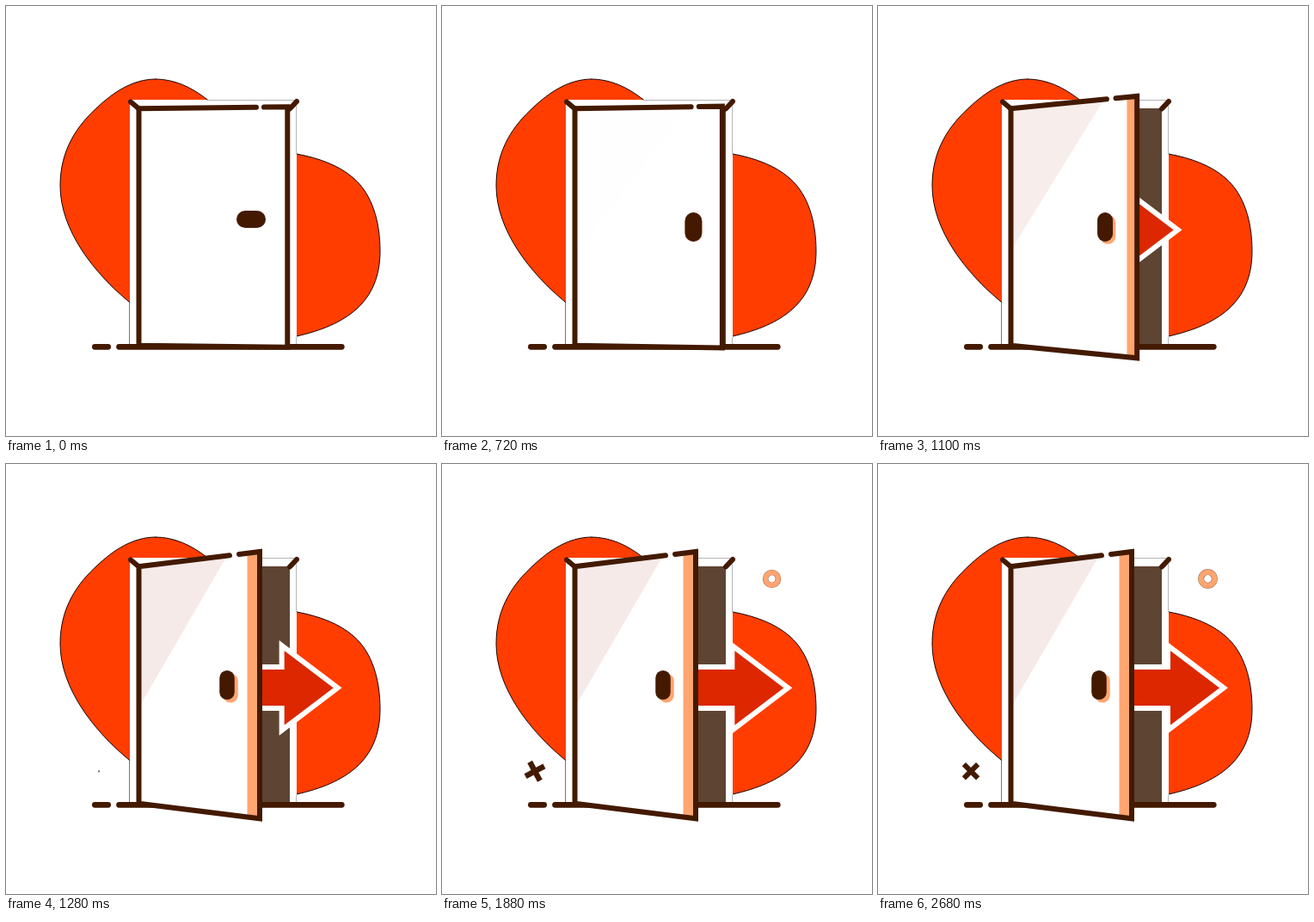
Write an HTML page with a canvas that moves like this. It is 500 px wide and 500 px high and loops after 3.04 s.

```html
<!DOCTYPE html>
<html lang="en">
<head>
<meta charset="utf-8">
<title>Opening door</title>
<style>
  html, body { margin: 0; width: 100%; height: 100%; overflow: hidden; background: #fff; }
  canvas { display: block; width: 500px; height: 500px; }
</style>
</head>
<body>
<canvas id="stage" width="500" height="500"></canvas>
<script>
const ctx = document.getElementById('stage').getContext('2d');
const LOOP = 3040;
const ORANGE = '#ff3d00', BROWN = '#431a00', DARK = '#5e4432';
const PEACH = '#ffa570', RED = '#dc2700', GLASS = '#f5eae8';

const mix = (a, b, k) => a + (b - a) * k;

function ease(t, start, end) {
  const s = Math.min(1, Math.max(0, (t - start) / (end - start)));
  return s * s * (3 - 2 * s);
}

// Eases from one value to a peak, then settles on a final value.
function overshoot(t, [start, top, end], [from, peak, rest]) {
  return t < top ? mix(from, peak, ease(t, start, top)) : mix(peak, rest, ease(t, top, end));
}

function trace(points, closed) {
  ctx.beginPath();
  points.forEach(([x, y]) => ctx.lineTo(x, y));
  if (closed) ctx.closePath();
}

function fill(points, color) {
  trace(points, true);
  ctx.fillStyle = color;
  ctx.fill();
}

function line(points, color = BROWN, width = 6, cap = 'round') {
  trace(points);
  ctx.strokeStyle = color;
  ctx.lineWidth = width;
  ctx.lineCap = cap;
  ctx.stroke();
}

function rect(x1, y1, x2, y2, color) {
  ctx.fillStyle = color;
  ctx.fillRect(x1, y1, x2 - x1, y2 - y1);
}

function pill(x, y, w, h, color) {
  ctx.beginPath();
  ctx.roundRect(x - w / 2, y - h / 2, w, h, Math.min(w, h) / 2);
  ctx.fillStyle = color;
  ctx.fill();
}

function drawBlob() {
  ctx.beginPath();
  ctx.moveTo(174, 85);
  ctx.bezierCurveTo(195, 85, 215, 94, 233, 108);
  ctx.bezierCurveTo(270, 138, 300, 165, 338, 172);
  ctx.bezierCurveTo(365, 177, 388, 186, 404, 200);
  ctx.bezierCurveTo(426, 219, 435, 251, 435, 285);
  ctx.bezierCurveTo(435, 345, 395, 371, 338, 384);
  ctx.bezierCurveTo(270, 400, 200, 390, 143, 344);
  ctx.bezierCurveTo(103, 311, 63, 261, 63, 209);
  ctx.bezierCurveTo(63, 166, 84, 138, 106, 118);
  ctx.bezierCurveTo(124, 101, 147, 85, 174, 85);
  ctx.fillStyle = ORANGE;
  ctx.fill();
  ctx.strokeStyle = '#1a0500';
  ctx.lineWidth = 1;
  ctx.stroke();
}

function drawFrame() {
  rect(144, 109, 338, 395, '#fff');
  const hair = (x1, y1, x2, y2, color) => line([[x1, y1], [x2, y2]], color, 1, 'butt');
  hair(233, 109.5, 338, 109.5, '#b5b5b5');
  hair(337.5, 116, 337.5, 172, '#b5b5b5');
  hair(337.5, 385, 337.5, 394, '#b5b5b5');
  hair(143.5, 345, 143.5, 394, '#777');
  rect(157, 119, 330, 394, DARK);
  line([[103.3, 396.3], [118.7, 396.3]], BROWN, 6.7);
  line([[131.5, 396.3], [390.3, 396.3]], BROWN, 6.7);
  line([[338, 111], [330, 119.5]]);
}

function drawArrow(t) {
  const dx = overshoot(t, [620, 1500, 1960], [-130, 4.5, 0]);
  const head = 337 + dx, tip = 402 + dx;
  const shape = [[190, 236], [head, 236], [head, 211], [tip, 260.3],
                 [head, 309.6], [head, 284], [190, 284]];
  fill(shape, RED);
  ctx.strokeStyle = '#fff';
  ctx.lineWidth = 6;
  ctx.stroke();
}

function drawHandle(t, p) {
  const turn = ease(t, 100, 620);
  if (turn < 1) {
    ctx.save();
    ctx.translate(294, 248);
    ctx.rotate(-turn * Math.PI / 2);
    pill(-9, 0, 34, 20, BROWN);
    ctx.restore();
    return;
  }
  const x = 294 - 37 * p, w = 20 - 2.5 * p;
  pill(x + 4 * p, 257 + 3.5 * p, w, 34, PEACH);
  pill(x, 257, w, 34, BROWN);
}

function drawDoor(t) {
  const p = ease(t, 640, 1280);
  const left = 154.5, right = 327.3 - 32.3 * p;
  const top = 117.3 - 15.3 * p, bottom = 396.8 + 15.5 * p;
  const along = (a, b) => x => [x, mix(a, b, (x - left) / (right - left))];
  const onTop = along(119.2, top), onBottom = along(394.8, bottom);

  fill([onTop(left), onTop(right), onBottom(right), onBottom(left)], '#fff');
  const strip = right - 14.5 * p;
  fill([onTop(strip), onTop(right), onBottom(right), onBottom(strip)], PEACH);

  ctx.globalAlpha = p;
  fill([onTop(left), onTop(mix(287, 257, p)), [left, mix(291, 283, p)]], GLASS);
  ctx.globalAlpha = 1;

  line([onTop(300 - 29 * p), [right, top], [right, bottom],
        onBottom(left), onTop(left), onTop(291 - 31 * p)]);
  line([[145, 111.5], [154, 119]]);
  drawHandle(t, p);
}

function drawCross(t) {
  const keys = [1180, 1700, 2120];
  const scale = overshoot(t, keys, [0, 1.13, 1]);
  if (!scale) return;
  ctx.save();
  ctx.translate(108, 357.3);
  ctx.rotate(overshoot(t, keys, [-165, 73, 45]) * Math.PI / 180);
  ctx.scale(scale, scale);
  line([[-11.5, 0], [11.5, 0]], BROWN, 6, 'butt');
  line([[0, -11.5], [0, 11.5]], BROWN, 6, 'butt');
  ctx.restore();
}

function drawRing(t) {
  const scale = overshoot(t, [1560, 2000, 2420], [0, 1.15, 1]);
  if (!scale) return;
  const disc = (r, color) => pill(383.5, 133.5, 2 * r * scale, 2 * r * scale, color);
  disc(11.2, '#8a5030');
  disc(10.8, PEACH);
  disc(4.8, '#8a5030');
  disc(4.4, '#fff');
}

function draw(t) {
  rect(0, 0, 500, 500, '#fff');
  drawBlob();
  drawFrame();
  drawArrow(t);
  drawDoor(t);
  drawCross(t);
  drawRing(t);
}

const begin = performance.now();
function tick() {
  draw((performance.now() - begin) % LOOP);
  requestAnimationFrame(tick);
}
tick();
</script>
</body>
</html>
```
